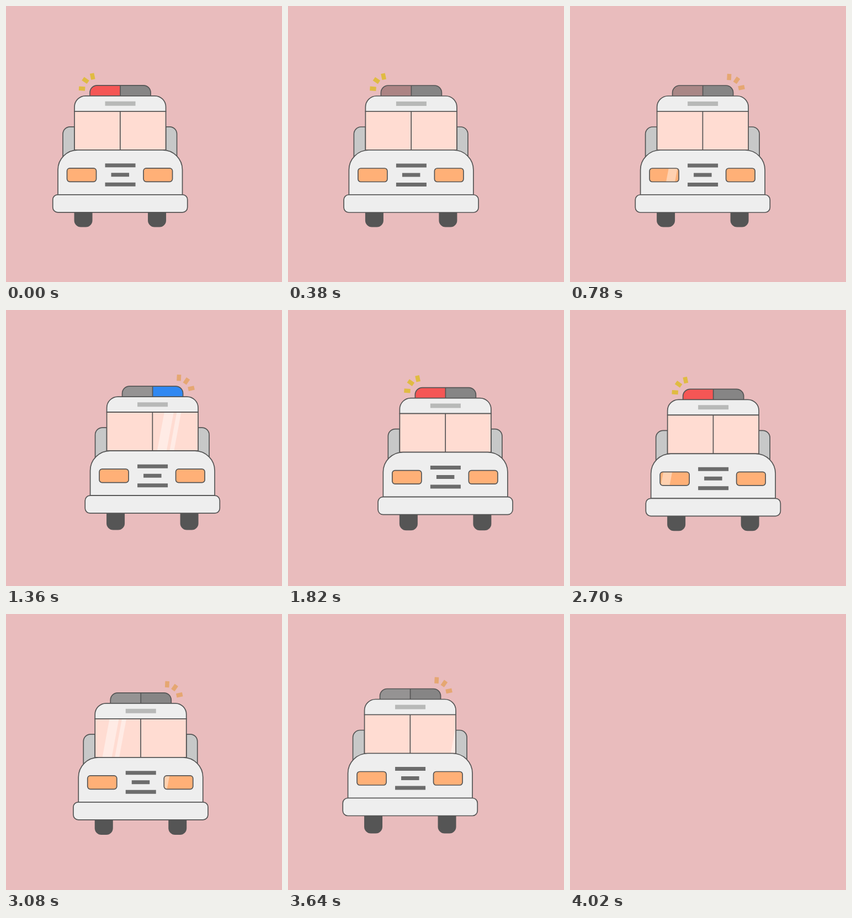
An HTML page for the animation above (4.04 s loop, 500 by 500 pixels).

```html
<!DOCTYPE html>
<html lang="en">
<head>
<meta charset="utf-8">
<title>Emergency van</title>
<style>
  html, body { margin: 0; width: 100%; height: 100%; overflow: hidden; background: #e9bcbd; }
  svg { display: block; width: 100vw; height: 100vh; }
  .line { stroke: #555; stroke-width: 1.7; }
</style>
</head>
<body>
<svg viewBox="0 0 500 500">
  <defs>
    <clipPath id="glass"><path d="M124 191H289.5V261H124Z"/></clipPath>
    <clipPath id="lamps">
      <rect x="110.5" y="294" width="53" height="24.5" rx="5"/>
      <rect x="249" y="294" width="52.5" height="24.5" rx="5"/>
    </clipPath>
  </defs>
  <g id="van">
    <g id="wheels" fill="#555">
      <rect x="123.5" y="355" width="33" height="45.5" rx="12"/>
      <rect x="257" y="355" width="33" height="45.5" rx="12"/>
    </g>
    <g id="body">
      <g id="raysLeft" fill="#e0bb42"></g>
      <g id="raysRight" fill="#e5a772"></g>

      <g class="line" fill="#c7c8c8">
        <path d="M124 278H103V232A13 13 0 0 1 116 219H124Z"/>
        <path d="M289.5 278H309.5V232A13 13 0 0 0 296.5 219H289.5Z"/>
      </g>

      <path id="halfLeft" d="M152 163V157A13 13 0 0 1 165 144H207V163Z" fill="#959393"/>
      <path id="red" d="M152 163V157A13 13 0 0 1 165 144H207V163Z" fill="#f55655"/>
      <path id="halfRight" d="M207 144H249A13 13 0 0 1 262 157V163H207Z" fill="#868585"/>
      <path id="blue" d="M207 144H249A13 13 0 0 1 262 157V163H207Z" fill="#3088f2"/>
      <path class="line" fill="none" d="M152 163V157A13 13 0 0 1 165 144H249A13 13 0 0 1 262 157V163M207 144V163"/>

      <path class="line" fill="#eee" d="M124 191V183A20 20 0 0 1 144 163H269.5A20 20 0 0 1 289.5 183V191Z"/>
      <path fill="#b8b9b8" d="M179.5 173H234.5V181H179.5Z"/>

      <path fill="#ffdcd2" d="M124 191H289.5V261H124Z"/>
      <g clip-path="url(#glass)">
        <path id="shine" fill="#fff" fill-opacity=".42" d="M0 261L13 191H30L17 261ZM22.5 261L35.5 191H43.5L30.5 261Z"/>
      </g>
      <path class="line" fill="none" d="M124 191H289.5V261H124ZM206.8 191V261"/>

      <path class="line" fill="#eee" d="M94 342V297A36 36 0 0 1 130 261H283.5A36 36 0 0 1 319.5 297V342Z"/>
      <path fill="#6c6c6c" d="M179.5 285.5H234.5V292.5H179.5ZM190.5 302.5H223V309.5H190.5ZM179.5 320H234.5V327H179.5Z"/>
      <g fill="#ffb077">
        <rect x="110.5" y="294" width="53" height="24.5" rx="5"/>
        <rect x="249" y="294" width="52.5" height="24.5" rx="5"/>
      </g>
      <g clip-path="url(#lamps)">
        <path id="lampShine" fill="#fff" fill-opacity=".42" d="M0 319L5 293H21L16 319Z"/>
      </g>
      <g class="line" fill="none">
        <rect x="110.5" y="294" width="53" height="24.5" rx="5"/>
        <rect x="249" y="294" width="52.5" height="24.5" rx="5"/>
      </g>
      <rect class="line" fill="#eee" x="84.7" y="342" width="244" height="32" rx="9"/>
    </g>
  </g>
</svg>
<script>
  const LOOP = 4040, TURN = 1940, END = 4000, REACH = 83.5;
  const el = id => document.getElementById(id);
  const move = (id, x, y) => el(id).setAttribute('transform', `translate(${x} ${y})`);
  const fade = (id, value) => el(id).setAttribute('opacity', value);
  const ramp = (a, b, v) => Math.min(1, Math.max(0, (v - a) / (b - a)));

  // Each ray: centre x, centre y, angle
  const addRays = (id, rays) => {
    el(id).innerHTML = rays.map(([x, y, angle]) =>
      `<rect x="-3.8" y="-5.6" width="7.6" height="11.2" transform="translate(${x} ${y}) rotate(${angle})"/>`).join('');
  };
  addRays('raysLeft', [[156.7, 127.7, -12], [144, 135, -55], [137.6, 149.8, -86]]);
  addRays('raysRight', [[254.7, 128.6, 3], [268.3, 134.6, 35], [277, 147.9, 78]]);

  // Quick jolt up, then a soft settle
  const hop = p => -8.5 * (p < 0.1 ? p / 0.1 : (1 + Math.cos(Math.PI * ramp(0.1, 0.9, p))) / 2);

  function draw(t) {
    el('van').style.display = t < 4010 ? '' : 'none';

    const x = REACH * (t < TURN ? t / TURN : 1 - ramp(TURN, END, t));
    const y = hop(t % 400 / 400);
    move('van', x, 0);
    move('body', 0, y);
    move('wheels', 0, y * 0.36);

    const p = t % 800 / 800;
    fade('red', p < 0.5 ? 1 - ramp(0.4, 0.5, p) : ramp(0.97, 1, p));
    fade('blue', ramp(0.56, 0.63, p) * (1 - ramp(0.77, 0.85, p)));
    fade('raysLeft', p < 0.5 ? 1 : 0);
    fade('raysRight', p < 0.5 ? 0 : 1);

    const u = (t % 2000 - 1360) / 280;
    const sweep = 215 + 71.5 * u - 6.5 * u * u;
    move('shine', sweep, 0);
    move('lampShine', sweep + 101, 0);
  }

  const start = performance.now();
  function tick() {
    draw((performance.now() - start) % LOOP);
    requestAnimationFrame(tick);
  }
  tick();
</script>
</body>
</html>
```
